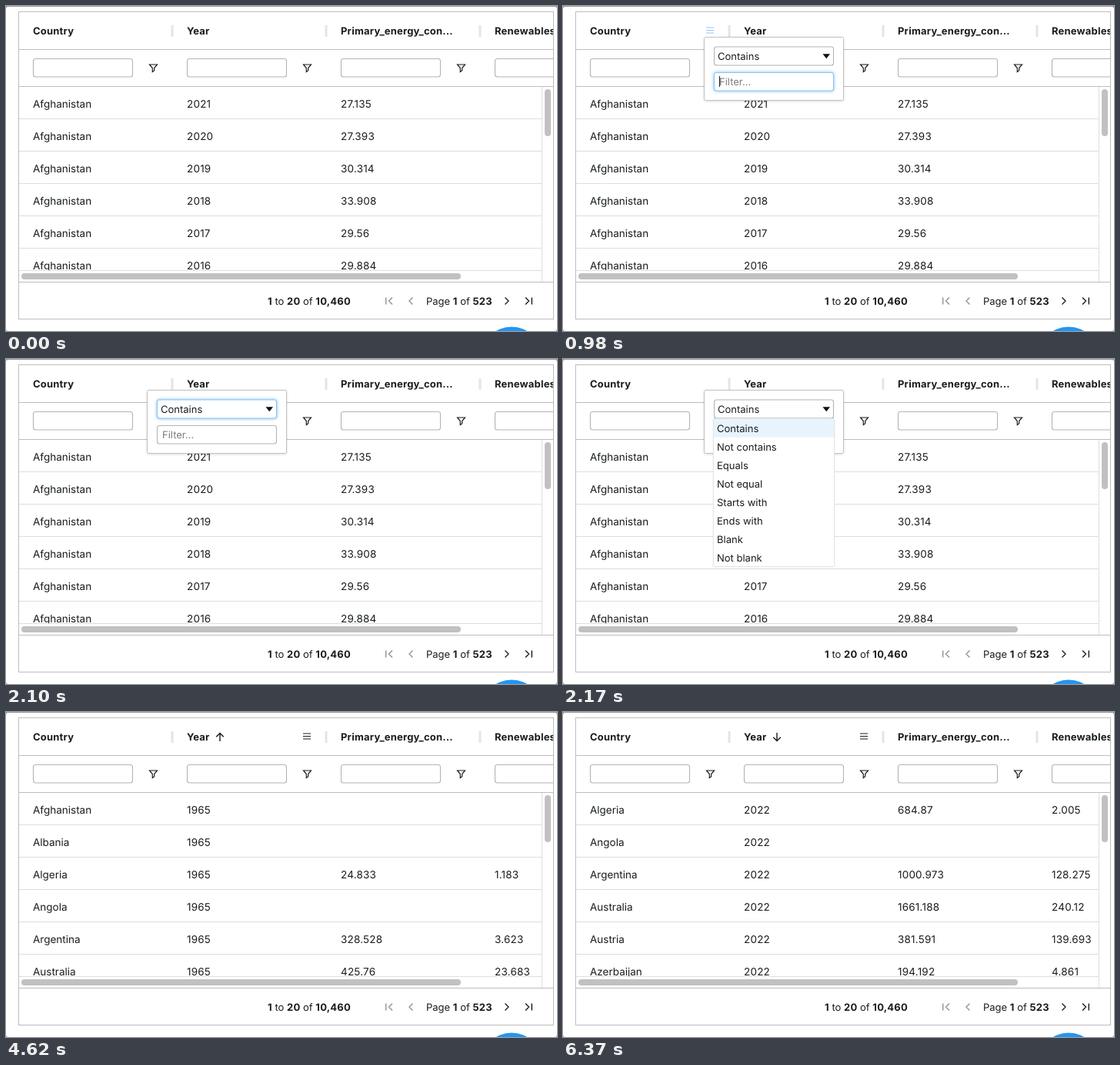
An HTML page that plays this animation: 716x422 px, repeating every 7.56 s.

```html
<!DOCTYPE html>
<html lang="en">
<head>
<meta charset="utf-8">
<title>Data grid</title>
<style>
html, body { margin: 0; width: 100%; height: 100%; overflow: hidden; background: #999; }
svg { display: block; }
text { font: 13.5px Inter, sans-serif; fill: #181d1f; white-space: pre; text-rendering: geometricPrecision; }
.number { letter-spacing: .2px; }
.small { font-size: 13px; }
.bold { font-weight: 700; font-size: 13px; letter-spacing: .2px; }
.hint { fill: #7c7c7c; }
.icon { fill: none; stroke: #181d1f; stroke-width: 1.4; }
.off { stroke: #909394; }
.thin { stroke-width: 1.2; }
.line { fill: none; stroke: #bdbdbd; }
.rule { fill: none; stroke: #dedede; }
.thumb { fill: #c1c1c1; }
.field { fill: #fff; stroke: #b4b4b4; stroke-width: 1.1; }
.focus { stroke: #8cc4f0; filter: drop-shadow(0 0 2px #7fbdf0); }
.card { fill: #fff; stroke: #c2c2c2; filter: drop-shadow(0 1px 1.5px #0002); }
.list { fill: #fff; stroke: #e4e4e4; filter: drop-shadow(0 0 1px #0001); }
</style>
</head>
<body>
<svg id="stage" width="716" height="422" viewBox="0 0 716 422"></svg>
<script>
const LOOP = 7560, STEP = 70;
const COLUMNS = [35, 235, 435, 635];
const HEADERS = ["Country", "Year", "Primary_energy_con...", "Renewables"];
const OPTIONS = ["Contains", "Not contains", "Equals", "Not equal",
  "Starts with", "Ends with", "Blank", "Not blank"];
const TABLES = {
  plain: ["27.135", "27.393", "30.314", "33.908", "29.56", "29.884"]
    .map((energy, i) => ["Afghanistan", 2021 - i, energy]),
  ascending: [["Afghanistan", 1965], ["Albania", 1965], ["Algeria", 1965, "24.833", "1.183"],
    ["Angola", 1965], ["Argentina", 1965, "328.528", "3.623"], ["Australia", 1965, "425.76", "23.683"]],
  descending: [["Algeria", 2022, "684.87", "2.005"], ["Angola", 2022],
    ["Argentina", 2022, "1000.973", "128.275"], ["Australia", 2022, "1661.188", "240.12"],
    ["Austria", 2022, "381.591", "139.693"], ["Azerbaijan", 2022, "194.192", "4.861"]]
};

const text = (x, y, label, cls = "") => `<text x="${x}" y="${y}" class="${cls}">${label}</text>`;
const path = (d, cls, extra = "") => `<path d="${d}" class="${cls}" ${extra}/>`;
const rect = (x, y, w, h, cls, r = 0, extra = "") =>
  `<rect x="${x}" y="${y}" width="${w}" height="${h}" rx="${r}" class="${cls}" ${extra}/>`;
const group = (id, content) => `<g id="${id}">${content}</g>`;
const menu = (id, x) => path(`M${x} 28h10m-10 3.5h10m-10 3.5h10`, "icon thin", `id="${id}"`);

const table = (id, rows) => group(id, rows.map((row, i) =>
  row.map((cell, c) => text(COLUMNS[c], 131.5 + 42 * i, cell, c ? "number" : "")).join("")).join(""));

const columnHead = (x, i) => text(x, 37, HEADERS[i], "bold")
  + rect(x + 179.5, 25, 3, 15, "", 0, 'fill="#e4e4e4"')
  + rect(x + .5, 68.5, 129, 23.5, "field", 3)
  + path(`M${x + 151.5} 76h10l-3.8 4.5v3.3l-2.4 1.8v-5.1z`, "icon thin");

const grid = `<defs>
    <clipPath id="inside"><path d="M17 8h694v398H17z"/></clipPath>
    <clipPath id="body"><path d="M17 105h679v238H17z"/></clipPath>
  </defs>`
  + rect(0, 1, 716, 421, "", 3, 'fill="#fff"')
  + '<circle cx="657" cy="456.5" r="40" fill="#2196f3"/>'
  + rect(16.5, 7.5, 695, 399, "line")
  + `<g clip-path="url(#inside)">${COLUMNS.map(columnHead).join("")}</g>`
  + path("M17 56.5H711M17 104.5H711M17 358.5H711", "line")
  + path("M17 146.5H696m-679 42H696m-679 42H696m-679 42H696m-679 42H696M17 343.5H696.5V105M696.5 343V358", "rule")
  + `<g clip-path="url(#body)">${Object.entries(TABLES).map(([id, rows]) => table(id, rows)).join("")}</g>`
  + rect(20, 347, 571, 8, "thumb", 4) + rect(700, 108, 8, 61, "thumb", 4);

const bold = s => `<tspan class="bold">${s}</tspan>`;
const pager = text(340, 387.5, `${bold(1)} to ${bold(20)} of ${bold("10,460")}`, "small")
  + text(546, 387.5, `Page ${bold(1)} of ${bold(523)}`, "small")
  + path("M493.7 378.5v9M502 378.5l-4.5 4.5 4.5 4.5M528.5 378.5l-4.5 4.5 4.5 4.5", "icon off")
  + path("M648.5 378.5l4.5 4.5-4.5 4.5M675 378.5l4.5 4.5-4.5 4.5M683.3 378.5v9", "icon");

const popup = rect(183.5, 40.5, 181, 82, "card", 2)
  + rect(196.5, 53, 155, 24, "field", 3, 'id="select"') + text(201, 70.3, "Contains", "small")
  + path("M337.5 62.3h9.5l-4.75 5.9z", "", 'fill="#111"')
  + rect(196.5, 86.5, 155, 23.5, "field", 3, 'id="input"') + text(203, 103.3, "Filter...", "small hint")
  + path("M203.5 91v14", "icon", 'id="caret" style="stroke-width:1"');

const options = rect(195.5, 77.5, 157, 192, "list", 1)
  + rect(196, 78, 156, 23.5, "", 0, 'fill="#e8f4fd"')
  + OPTIONS.map((label, i) => text(200, 94.8 + 24 * i, label, "small")).join("");

document.getElementById("stage").innerHTML = grid + pager
  + menu("countryMenu", 186) + menu("yearMenu", 386)
  + path("M278 38v-10.5m-4.8 4.8l4.8-4.8 4.8 4.8", "icon", 'id="up"')
  + path("M278 27v10.5m-4.8-4.8l4.8 4.8 4.8-4.8", "icon", 'id="down"')
  + group("popup", popup) + group("options", options);

const el = id => document.getElementById(id);
const show = (id, visible) => el(id).style.display = visible ? "" : "none";
const fadeIn = (t, start) => Math.min(1, Math.max(0, (Math.floor((t - start) / STEP) + 1) / 3));

function draw(now) {
  const t = now % LOOP;
  const between = (from, to) => t >= from && t < to;
  show("plain", t < 4620);
  show("ascending", between(4620, 5880));
  show("descending", t >= 5880);
  show("up", between(4620, 5880));
  show("down", t >= 5880);

  show("countryMenu", t < 1050);
  el("countryMenu").style.opacity = t < 980 ? fadeIn(t, 420) : .5;
  el("countryMenu").style.stroke = t < 980 ? "" : "#2196f3";
  el("yearMenu").style.opacity = fadeIn(t, 3780);

  show("popup", between(980, 4620));
  show("options", between(2170, 4620));
  show("caret", between(980, 1470) || between(1960, 2100));
  el("input").classList.toggle("focus", t < 2100);
  el("select").classList.toggle("focus", between(2100, 2170));
  requestAnimationFrame(draw);
}
draw(performance.now());
</script>
</body>
</html>
```
